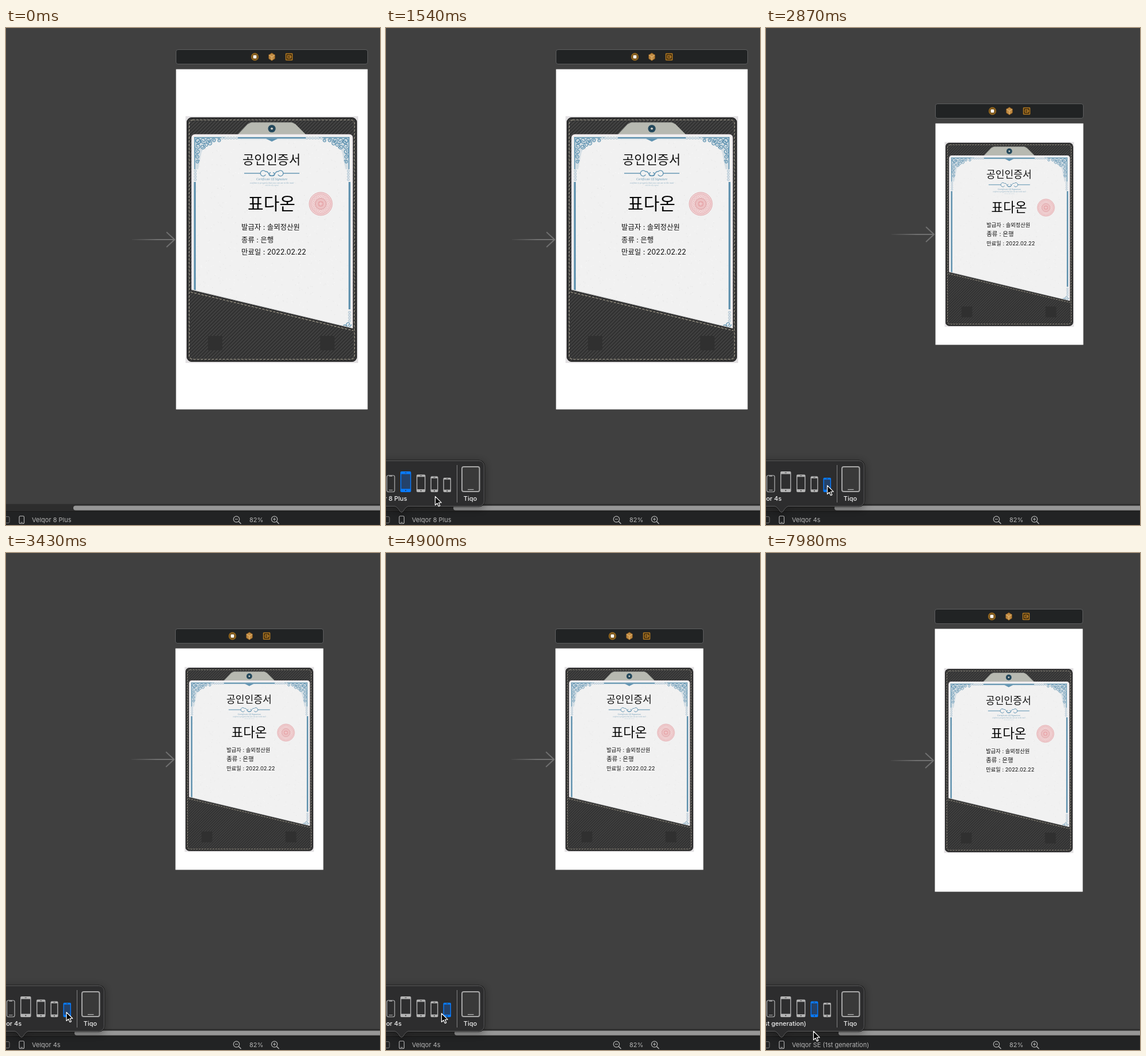
These frames come from a looping animation (650 by 862 pixels, 8000 ms). An HTML page with a canvas:

```html
<!DOCTYPE html>
<html lang="ko">
<head>
<meta charset="utf-8">
<title>Device preview</title>
<style>
html, body { margin: 0; width: 100%; height: 100%; overflow: hidden; background: #404040; }
canvas { display: block; }
</style>
</head>
<body>
<canvas id="stage" width="650" height="862"></canvas>
<script>
const ctx = document.getElementById('stage').getContext('2d');
const LOOP = 8000, STEP = 70;
const UI = 'Inter, sans-serif';
const KR = '"Noto Sans CJK KR", "Noto Sans CJK", sans-serif';
const MIXED = 'Inter, ' + KR;
const BLUE = '#5f93b1', ACCENT = '#087bff', GREY = '#b4b4b4';

const DEVICES = {
  plus: { name: 'Velqor 8 Plus', x: 295, y: 71, w: 334, h: 591, scale: 1, inset: 19, bar: 117, title: 1, row: 1 },
  mini: { name: 'Velqor 4s', x: 294, y: 165, w: 258, h: 385, scale: 0.749, inset: 18, bar: 119, title: 1.04, row: 1.13 },
  se: { name: 'Velqor SE (1st generation)', x: 293, y: 131, w: 258, h: 457, scale: 0.749, inset: 18, bar: 126, title: 1.04, row: 1.13 }
};

// time, x, y of the pointer tip
const POINTER = [
  [0, 66, 866], [280, 66, 866], [490, 64, 856], [630, 64, 856], [770, 63, 855],
  [1190, 63, 855], [1540, 85, 812], [1680, 85, 812], [1890, 114, 797], [2100, 107, 794],
  [2800, 107, 794], [2870, 106, 793], [3360, 106, 793], [3710, 92, 822], [3780, 92, 822],
  [4060, 44, 842], [4130, 44, 842], [4410, 107, 797], [4550, 107, 797], [4760, 97, 797],
  [4830, 97, 797], [4900, 96, 798], [5110, 96, 798], [5320, 91, 795], [5460, 90, 795],
  [6580, 90, 795], [6790, 88, 795], [7560, 88, 795], [7910, 82, 829], [8000, 82, 829]
];

const pick = (t, list) => list.filter(e => t >= e[0]).pop()[1];

function pointerAt(t) {
  const i = Math.max(1, POINTER.findIndex(k => k[0] >= t));
  const [t0, x0, y0] = POINTER[i - 1], [t1, x1, y1] = POINTER[i];
  const p = (t - t0) / (t1 - t0), e = p * p * (3 - 2 * p);
  return [x0 + (x1 - x0) * e, y0 + (y1 - y0) * e];
}

function random(seed) {
  return () => (seed = (seed * 16807) % 2147483647) / 2147483647;
}

function rect(x, y, w, h, fill) {
  ctx.fillStyle = fill;
  ctx.fillRect(x, y, w, h);
}

function paint(fill, stroke, width = 1) {
  if (fill) { ctx.fillStyle = fill; ctx.fill(); }
  if (stroke) { ctx.strokeStyle = stroke; ctx.lineWidth = width; ctx.stroke(); }
}

function round(x, y, w, h, r, fill, stroke, width) {
  ctx.beginPath();
  ctx.roundRect(x, y, w, h, r);
  paint(fill, stroke, width);
}

function circle(x, y, r, fill, stroke, width) {
  ctx.beginPath();
  ctx.arc(x, y, r, 0, Math.PI * 2);
  paint(fill, stroke, width);
}

function poly(points, fill, stroke, width, open) {
  ctx.beginPath();
  points.forEach(([x, y]) => ctx.lineTo(x, y));
  if (!open) ctx.closePath();
  paint(fill, stroke, width);
}

const line = (x0, y0, x1, y1, color, width) => poly([[x0, y0], [x1, y1]], null, color, width, true);

function text(str, x, y, font, color, align = 'left') {
  ctx.font = font;
  ctx.fillStyle = color;
  ctx.textAlign = align;
  ctx.textBaseline = 'alphabetic';
  ctx.fillText(str, x, y);
}

function spiral(x, y, r, start, dir) {
  ctx.beginPath();
  for (let a = 0; a < 9; a += 0.3) {
    const k = r * (1 - a / 11), b = start + a * dir;
    ctx.lineTo(x + k * Math.cos(b), y + k * Math.sin(b));
  }
  paint(null, BLUE, 1.3);
}

// Draws a shape and its mirror image about the certificate's middle.
function mirrored(draw) {
  draw();
  ctx.save();
  ctx.translate(296, 0);
  ctx.scale(-1, 1);
  draw();
  ctx.restore();
}

// ---- certificate, laid out in a 296 x 424 box ----

function leather(path, top, bottom) {
  ctx.save();
  path();
  const g = ctx.createLinearGradient(0, 0, 0, 424);
  g.addColorStop(0, top);
  g.addColorStop(1, bottom);
  paint(g);
  ctx.clip();
  for (let i = 0; i < 724; i += 6) line(i, 0, i - 424, 424, 'rgba(22,22,22,.42)', 1.8);
  ctx.restore();
}

function stitch(draw, color) {
  ctx.setLineDash([4, 2.4]);
  draw();
  paint(null, color, 1.1);
  ctx.setLineDash([]);
}

function corner() {
  ctx.globalAlpha = 0.2;
  poly([[13, 34], [60, 34], [46, 42], [33, 48], [26, 60], [20, 90], [13, 90]], BLUE);
  ctx.globalAlpha = 1;
  for (let i = 0; i < 5; i++) {
    const r = 6 - i * 0.6, d = 6 + i * 9;
    spiral(14 + d, 40, r, i, 1);
    spiral(19, 35 + d, r, i + 2, -1);
    if (i < 3) spiral(28 + i * 6, 51 - i * 3, 4.5, i * 2, 1);
  }
  line(13, 35, 66, 35, BLUE, 1.6);
  line(14, 34, 14, 90, BLUE, 1.6);
  for (let i = 0; i < 6; i++) circle(62 + i * 5, 36, 2, '#dfe5ea', '#9db9cb', 0.8);
  for (let i = 0; i < 4; i++) circle(15, 93 + i * 5, 2, '#dfe5ea', '#9db9cb', 0.8);
}

function flourish() {
  mirrored(() => {
    line(100, 97, 128, 97, BLUE, 1.4);
    ctx.beginPath();
    ctx.arc(133, 97, 4.8, 0.5, 5.6);
    ctx.bezierCurveTo(143, 92, 141, 101.5, 149, 101.5);
    ctx.bezierCurveTo(154, 101.5, 154, 96, 150, 96);
    paint(null, BLUE, 1.3);
  });
  text('Certificate Of Signature', 148, 109, 'italic 5.6px "Liberation Serif", serif', '#6f9cb6', 'center');
  text('confirm to progress that you can use in the mail', 148, 115, 'italic 4px "Liberation Serif", serif', '#8fb0c4', 'center');
  text('and this day signed', 148, 119, 'italic 3px "Liberation Serif", serif', '#a5c0cf', 'center');
}

function seal(x, y) {
  circle(x, y, 20, '#f2d9da', '#e2a6aa', 1);
  for (let i = 0; i < 20; i++) {
    const a = i * Math.PI / 10;
    circle(x + 10 * Math.cos(a), y + 10 * Math.sin(a), 8, null, 'rgba(216,125,132,.34)', 0.7);
  }
  circle(x, y, 9.5, '#ecc0c2', '#dc9ca0', 0.9);
  circle(x, y, 6, '#e8adb0', '#f2d2d3', 0.8);
  line(x - 3, y, x + 3, y, '#f5dedf', 1);
  line(x, y - 3, x, y + 3, '#f5dedf', 1);
}

function paper() {
  ctx.save();
  ctx.beginPath();
  ctx.roundRect(9, 30, 279, 350, 5);
  paint('#f1f1f1', '#eee6ea', 1.5);
  ctx.clip();
  const rnd = random(71);
  for (let i = 0; i < 900; i++) {
    const x = 14 + rnd() * 270, y = 34 + rnd() * 330, d = rnd() * 4 - 2;
    line(x, y, x + d, y + 1.5, i % 2 ? 'rgba(212,212,212,.45)' : 'rgba(255,255,255,.6)', 0.9);
  }
  line(14.2, 112, 14.2, 320, '#5a8eac', 3.2);
  line(283, 112, 283, 333, '#5a8eac', 3.2);
  line(89, 35.5, 207, 35.5, '#5a8eac', 2.6);
  line(89, 38, 207, 38, '#c9dae4', 0.8);
  poly([[138, 37], [158, 37], [148, 42]], BLUE);
  mirrored(corner);
  for (let i = 0; i < 4; i++) circle(283, 338 + i * 5, 2, '#dfe5ea', '#9db9cb', 0.8);
  spiral(281, 359, 5, 0, 1);
  spiral(275, 363, 4, 2, 1);
  ctx.restore();
}

function pocket() {
  const edge = [[3, 299], [9, 300], [290, 367], [294, 369]];
  poly([[9, 298], [288, 365], [288, 369], [9, 302]], '#d6d7d7');
  leather(() => {
    ctx.beginPath();
    edge.forEach(p => ctx.lineTo(...p));
    ctx.lineTo(294, 416);
    ctx.arcTo(294, 422, 286, 422, 7);
    ctx.lineTo(10, 422);
    ctx.arcTo(2, 422, 2, 414, 7);
    ctx.closePath();
  }, '#434343', '#404040');
  poly(edge, null, '#282828', 1, true);
  stitch(() => {
    ctx.beginPath();
    ctx.moveTo(7, 303);
    ctx.lineTo(290, 370);
  }, '#a59e8c');
  for (const x of [37, 232]) round(x, 379, 25, 25, 1, '#303030');
}

function certificate(d) {
  ctx.save();
  ctx.translate(d.x + d.inset, d.y + d.h / 2 - 212 * d.scale + 0.5);
  ctx.scale(d.scale, d.scale);
  rect(-2, -2, 300, 428, '#e2e0e2');
  leather(() => { ctx.beginPath(); ctx.roundRect(0, 0, 296, 424, 9); }, '#434343', '#404040');
  round(1, 1, 294, 422, 8, null, '#2a2a2a', 2);
  poly([[88, 31], [106, 12], [112, 9], [183, 9], [189, 12], [208, 31]], '#b7b9b1', '#a2a49d', 1);
  circle(148, 19.5, 6.6, '#24495d');
  circle(148, 19.5, 2.6, '#c3c8c6', '#112d3c', 1);
  paper();
  flourish();
  seal(233, 150);
  text('공인인증서', 147.5, 80.5, `${22 * d.title}px ${KR}`, '#111', 'center');
  text('표다온', 147.5, 160, `500 30px ${KR}`, '#080808', 'center');
  text('발급자 : 솔뫼정산원', 95, 195, `12.4px ${MIXED}`, '#111');
  text('종류 : 은행', 95, 216.5, `${12.4 * d.row}px ${MIXED}`, '#111');
  text('만료일 : 2022.02.22', 95, 238, `12.4px ${MIXED}`, '#111');
  pocket();
  stitch(() => { ctx.beginPath(); ctx.roundRect(4.5, 4.5, 287, 415, 6); }, '#a19b8b');
  ctx.restore();
}

// ---- editor ----

function sceneBar(d) {
  const y = d.y - 33.5, cx = d.x + d.w / 2, cy = y + 12.5;
  round(d.x + 0.5, y, d.w - 1, 25, 3.5, '#212324', '#5d5e5f', 1);
  circle(cx - 29.5, cy, 6, '#79551c', '#9a6b20', 1.3);
  round(cx - 32.3, cy - 2.8, 5.6, 5.6, 1, '#fff');
  const hex = [];
  for (let a = 0; a < 6; a++) hex.push([cx + 6 * Math.sin(a * Math.PI / 3), cy - 6.5 * Math.cos(a * Math.PI / 3)]);
  poly(hex, '#c08a42', '#8a5a1e', 1);
  poly([hex[5], [cx, cy], hex[1]], null, '#e6bd7d', 1, true);
  line(cx, cy, cx, cy + 6, '#e6bd7d', 1);
  round(cx + 24.5, cy - 5.5, 11, 11, 0.5, '#3d2a0c', '#b37a22', 1.5);
  round(cx + 27.5, cy - 2.5, 5, 5, 0.5, null, '#c9892c', 1.2);
  line(cx + 29, cy, cx + 34, cy, '#c9892c', 1.2);
}

function entryArrow(d) {
  const x = d.x - 2, y = d.y + d.h / 2 + 0.5;
  const g = ctx.createLinearGradient(x - 74, 0, x - 30, 0);
  g.addColorStop(0, 'rgba(112,112,112,.1)');
  g.addColorStop(1, '#707070');
  line(x - 74, y, x, y, g, 2);
  poly([[x - 14, y - 13], [x, y], [x - 14, y + 13]], null, '#707070', 2, true);
}

function magnifier(x, plus) {
  const c = '#b3b3b3';
  circle(x, 852, 5.2, null, c, 1.2);
  line(x + 3.8, 855.8, x + 8, 860, c, 1.5);
  line(x - 2.5, 852, x + 2.5, 852, c, 1.1);
  if (plus) line(x, 849.5, x, 854.5, c, 1.1);
}

function bottomBar(d, label, hover) {
  rect(0, 825, 650, 14, '#2d2d2d');
  rect(0, 825, 650, 1, '#383838');
  round(d.bar, 828.5, 650, 8, 4, '#969696');
  rect(0, 839, 650, 23, '#222324');
  rect(0, 838, 650, 1, '#191919');
  if (hover) round(38, 844.5, 84, 17, 4, '#2d2e2f');
  round(-5, 847.5, 11, 11, 2, null, '#777', 1);
  round(23, 846.5, 8.5, 13, 2, null, '#b9b9b9', 1.1);
  line(25.5, 857.5, 29, 857.5, '#b9b9b9', 1);
  text(label, 45, 857, `11px ${UI}`, hover ? '#e4e4e4' : '#b5b5b5');
  magnifier(400.5, false);
  magnifier(466.5, true);
  text('82%', 423, 857, `11px ${UI}`, '#b5b5b5');
}

function phone(x, y, w, color) {
  const h = 805 - y, band = h * 0.13;
  round(x, y, w, h, 2, color);
  rect(x + 1.4, y + band, w - 2.8, h - 2 * band - 1, color === ACCENT ? '#24426a' : '#2e2e2f');
  line(x + w / 2 - 1.6, y + band / 2, x + w / 2 + 1.6, y + band / 2, '#333', 0.8);
  circle(x + w / 2, 805 - band / 2 - 0.5, 1, '#333');
}

function popover(size, alpha, colors, label) {
  ctx.save();
  ctx.globalAlpha = alpha;
  ctx.translate(27, 840);
  ctx.scale(size, size);
  ctx.translate(-27, -840);
  ctx.beginPath();
  ctx.moveTo(-120, 750.5);
  ctx.arcTo(170.5, 750.5, 170.5, 760, 9);
  ctx.arcTo(170.5, 829.5, 160, 829.5, 9);
  ctx.lineTo(39, 829.5);
  ctx.quadraticCurveTo(35, 830, 30, 838);
  ctx.quadraticCurveTo(27, 842, 24, 838);
  ctx.quadraticCurveTo(19, 830, 15, 829.5);
  ctx.lineTo(-120, 829.5);
  ctx.closePath();
  ctx.shadowColor = 'rgba(0,0,0,.35)';
  ctx.shadowBlur = 14;
  ctx.shadowOffsetY = 3;
  paint('#2d2d2e', '#0d0d0d', 2.2);
  ctx.shadowColor = 'transparent';
  paint('#2d2d2e', '#676768', 0.9);

  round(1.5, 776, 13.5, 28.5, 2.5, null, GREY, 1.2);
  line(5.5, 777, 11, 777, GREY, 1.5);
  line(5, 801.5, 11.5, 801.5, GREY, 1);
  phone(25, 769, 18.5, colors.plus);
  phone(53, 774.5, 15.5, GREY);
  phone(77.5, 777.5, 13, colors.se);
  phone(99.5, 780, 13.5, colors.mini);
  line(123.5, 758, 123.5, 823, '#828283', 1);
  round(131.5, 760.5, 31.5, 44, 3, '#aaa', '#a5a5a5', 1);
  round(133, 762, 28.5, 41, 2, '#393939');
  line(142, 800.5, 152.5, 800.5, '#bbb', 1.2);
  text(label, 2, 820, `500 11px ${UI}`, '#efefef', 'center');
  text('Tiqo', 146.5, 820, `500 11px ${UI}`, '#efefef', 'center');
  ctx.restore();
}

function cursor(x, y) {
  ctx.save();
  ctx.translate(x, y);
  ctx.lineJoin = 'round';
  poly([[0.5, 0.5], [0.5, 15.5], [4, 12.2], [6.4, 17.6], [8.8, 16.6], [6.5, 11.4], [11.2, 11.2]], '#000', '#fff', 1.2);
  ctx.restore();
}

function draw(t) {
  const device = DEVICES[pick(t, [[0, 'plus'], [2870, 'mini'], [7980, 'se']])];
  const label = DEVICES[pick(t, [[0, 'plus'], [2660, 'mini'], [7770, 'se']])].name;
  const shown = DEVICES[pick(t, [[0, 'plus'], [1820, 'mini'], [5250, 'se']])].name;
  const selected = pick(t, [[0, 'plus'], [2310, 'mini'], [7420, 'se']]);
  const colors = {
    plus: GREY,
    mini: pick(t, [[0, GREY], [1820, '#ffffff'], [2310, GREY]]),
    se: pick(t, [[0, GREY], [5250, '#ffffff'], [7280, '#8c8c8c']])
  };
  colors[selected] = ACCENT;

  rect(0, 0, 650, 862, '#404040');
  rect(649, 0, 1, 825, '#383838');
  entryArrow(device);
  sceneBar(device);
  rect(device.x + 0.5, device.y + 0.5, device.w - 1, device.h - 1, '#fff');
  certificate(device);
  bottomBar(device, label, t >= 910 && t < 1330);
  if (t >= 980) {
    const size = pick(t, [[980, 0.6], [1050, 0.86], [1120, 0.955], [1190, 0.99], [1260, 1]]);
    popover(size, pick(t, [[980, 0.5], [1050, 0.85], [1120, 1]]), colors, shown);
  }
  cursor(...pointerAt(t));
}

let last = -1;
function tick() {
  const t = Math.floor((performance.now() % LOOP) / STEP) * STEP;
  if (t !== last) draw(last = t);
  requestAnimationFrame(tick);
}
tick();
</script>
</body>
</html>
```
